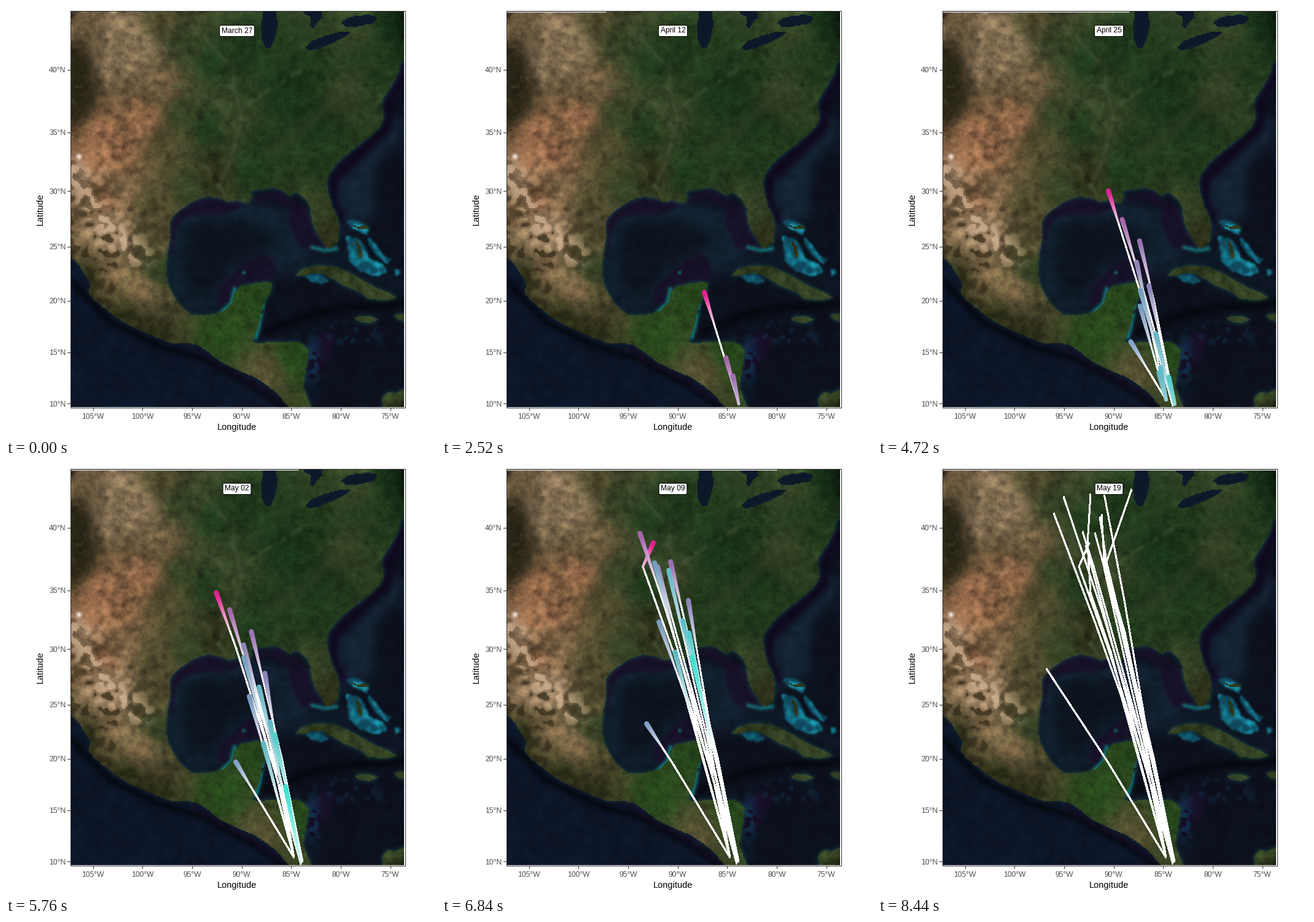
Write a matplotlib script that moves like this. It is 700 px wide and 700 px high and loops after 8480 ms.

```python
import matplotlib.pyplot as plt
import numpy as np
from matplotlib.animation import FuncAnimation
from matplotlib.collections import LineCollection
from matplotlib.colors import to_rgb
from matplotlib.patches import Rectangle
from matplotlib.path import Path

FRAMES, STEP, TAIL = 212, 40, 19
PX = 0.72  # points per pixel at 100 dpi
LEFT, RIGHT, TOP, BOTTOM = 105, 648, 8, 653
plt.rcParams["font.family"] = "Liberation Sans"
rng = np.random.default_rng(4)

# ---- satellite-style base map, worked out on a coarse grid ----
X, Y = np.meshgrid(np.arange(LEFT + 1, RIGHT + 1, 2.0), np.arange(TOP + 1, BOTTOM + 1, 2.0))
GRID = np.column_stack([X.ravel(), Y.ravel()])


def blur(a, s):
    n = int(3 * s) + 1
    k = np.exp(-0.5 * (np.arange(-n, n + 1) / s) ** 2)
    k /= k.sum()
    for axis in (0, 1):
        pad = [(0, 0), (0, 0)]
        pad[axis] = (n, n)
        a = np.apply_along_axis(np.convolve, axis, np.pad(a, pad, mode="edge"), k, "valid")
    return a


def noise(s):
    n = blur(rng.standard_normal(X.shape), s)
    return n / n.std()


def area(pts, soft=0):
    m = Path(pts).contains_points(GRID).reshape(X.shape).astype(float)
    return blur(m, soft) if soft else m


def stroke(pts, w):
    d = np.full(X.shape, 1e9)
    for (x0, y0), (x1, y1) in zip(pts, pts[1:]):
        dx, dy = x1 - x0, y1 - y0
        t = np.clip(((X - x0) * dx + (Y - y0) * dy) / (dx * dx + dy * dy), 0, 1)
        d = np.minimum(d, np.hypot(X - x0 - t * dx, Y - y0 - t * dy))
    return np.exp(-((d / w) ** 2))


def blob(x, y, rx, ry):
    return np.exp(-(((X - x) / rx) ** 2) - ((Y - y) / ry) ** 2)


def mix(img, rgb, amount):
    return img + (np.array(rgb) - img) * np.clip(amount, 0, 1)[..., None]


ATLANTIC = [
    (652, 86), (641, 93), (640, 108), (627, 132), (613, 153), (612, 165), (616, 176), (613, 190),
    (606, 200), (596, 210), (575, 226), (549, 247), (535, 262), (527, 273), (523, 287), (525, 302),
    (532, 328), (540, 345), (543, 360), (541, 385), (531, 396), (521, 393), (514, 380), (506, 368),
    (499, 354), (497, 329), (489, 314), (478, 305), (470, 303), (464, 309), (447, 298), (436, 296),
    (418, 298), (401, 301),
]
GULF = [
    (397, 305), (402, 311), (396, 321), (385, 319), (375, 316), (362, 319), (345, 312), (328, 310),
    (310, 315), (293, 325), (278, 337), (269, 347), (266, 358), (268, 373), (264, 398), (260, 430),
    (263, 452), (273, 472), (286, 491), (301, 503), (322, 505), (343, 501), (357, 496), (368, 484),
    (372, 468), (384, 457), (405, 453), (425, 450), (434, 453), (432, 466), (425, 478), (418, 493),
    (413, 520), (402, 547), (413, 551), (432, 547), (475, 547), (486, 553), (494, 563), (491, 583),
    (485, 620), (498, 656),
]
PACIFIC = [
    (464, 656), (440, 630), (425, 618), (405, 605), (364, 588), (346, 578), (328, 563), (312, 553),
    (292, 549), (270, 550), (245, 541), (198, 520), (178, 507), (145, 481), (135, 468), (137, 452),
    (117, 420), (100, 403),
]
CUBA = [
    (472, 440), (481, 430), (502, 424), (527, 423), (545, 428), (562, 436), (602, 459), (622, 467),
    (638, 476), (620, 480), (590, 478), (583, 470), (566, 462), (549, 455), (533, 445), (516, 436),
    (500, 435), (485, 441),
]
ISLANDS = [
    CUBA,
    [(568, 508), (588, 505), (607, 511), (592, 517), (574, 514)],
    [(631, 504), (652, 501), (652, 515), (640, 511)],
    [(616, 656), (613, 641), (622, 629), (636, 632), (652, 624), (652, 656)],
    [(571, 384), (577, 388), (582, 408), (577, 412), (573, 400)],
    [(560, 357), (575, 360), (589, 357), (592, 364), (574, 363)],
]
LAKES = [
    [(420, 6), (440, 6), (443, 30), (439, 52), (432, 68), (424, 67), (418, 55), (417, 33)],
    [(483, 6), (515, 6), (516, 19), (507, 26), (501, 37), (496, 31), (497, 18), (488, 14)],
    [(488, 68), (500, 57), (520, 49), (545, 42), (562, 41), (554, 50), (533, 60), (508, 70), (494, 72)],
    [(547, 27), (560, 18), (590, 14), (606, 18), (600, 28), (575, 33), (555, 35)],
]
TONES = {
    (48, 42, 26): [(118, 95), (122, 140), (112, 170)],
    (112, 92, 64): [(112, 25), (130, 330), (185, 300), (175, 430), (220, 465), (250, 130)],
    (134, 113, 85): [(180, 25), (165, 90), (215, 75), (160, 350)],
    (146, 103, 72): [(180, 240), (150, 205), (225, 185), (135, 250), (160, 320)],
    (160, 133, 103): [(178, 375), (118, 275)],
    (78, 74, 46): [(250, 20), (240, 320), (245, 385), (250, 500), (262, 220), (425, 595)],
    (52, 66, 36): [(290, 60), (285, 180), (300, 300), (250, 430), (370, 190), (550, 140), (570, 40),
                   (500, 340), (570, 452)],
    (45, 49, 25): [(130, 445), (195, 505), (250, 530), (340, 275), (525, 375)],
    (31, 56, 27): [(340, 90), (400, 70), (430, 230), (500, 110), (600, 90), (520, 240), (400, 270), (330, 200)],
    (23, 49, 24): [(630, 30), (455, 140), (500, 185)],
    (37, 70, 27): [(405, 475), (470, 572), (350, 535)],
}


def paint_sea(land, mid, wide):
    ocean = area(PACIFIC + [(100, 656)])
    sea = np.zeros(X.shape + (3,)) + (12, 17, 29)
    sea = mix(sea, (13, 22, 40), ocean)
    sea = mix(sea, (19, 34, 50), area([(266, 345), (400, 318), (490, 340), (520, 400), (480, 425), (440, 440),
                                       (370, 480), (300, 505), (262, 450)], 4))
    sea = mix(sea, (12, 20, 30), area([(290, 362), (345, 350), (420, 358), (455, 385), (420, 400), (365, 430),
                                       (335, 475), (300, 470), (285, 420)], 5))
    sea = mix(sea, (21, 37, 54), area([(528, 335), (530, 290), (590, 240), (640, 175), (648, 205), (600, 262),
                                       (598, 345), (565, 365), (545, 370)], 4))
    sea = mix(sea, (17, 29, 46), 0.7 * area([(480, 405), (560, 400), (650, 445), (650, 470), (560, 425), (470, 440)], 5))
    shelves = [
        [(264, 400), (266, 350), (290, 322), (330, 310), (400, 315), (440, 297), (497, 335), (503, 365), (532, 400),
         (500, 404), (478, 392), (464, 360), (460, 330), (436, 312), (400, 320), (378, 330), (348, 342), (318, 339),
         (290, 346), (276, 365), (270, 410)],
        [(345, 462), (365, 442), (395, 416), (418, 404), (434, 412), (441, 432), (433, 453), (400, 452), (375, 466),
         (360, 488), (345, 488)],
        [(492, 555), (518, 530), (542, 540), (527, 575), (507, 602), (490, 604)],
    ]
    sea = mix(sea, (23, 15, 39), 0.9 * sum(area(p, 1.5) for p in shelves))
    sea = mix(sea, (15, 10, 31), stroke([(642, 118), (622, 160), (620, 195), (570, 243), (534, 280), (531, 315),
                                         (546, 350)], 12))
    sea = mix(sea, (6, 7, 12), 0.8 * stroke([(425, 530), (500, 502), (560, 491), (650, 484)], 9))
    sea = mix(sea, (5, 8, 15), 0.8 * stroke([(105, 448), (170, 516), (250, 555), (320, 575), (400, 618), (452, 654)], 7))
    sea = mix(sea, (17, 12, 31), 0.8 * stroke([(310, 560), (350, 588), (400, 612), (450, 648)], 5))
    sea = mix(sea, (16, 58, 88), 0.8 * blob(500, 580, 12, 32) * (mid > -0.2))
    sea = mix(sea, (17, 42, 66), 0.6 * blob(560, 535, 60, 18) * (mid > 0.9))

    coast = np.clip(blur(land, 1.8) * 1.7, 0, 1)
    sea = mix(sea, (25, 66, 66), coast * np.where(ocean > 0, 0.2, 0.75))
    banks = [
        [(555, 375), (572, 379), (585, 392), (592, 412), (612, 420), (622, 434), (603, 441), (578, 433), (560, 415)],
        [(556, 352), (574, 349), (592, 362), (588, 373), (563, 361)],
        [(590, 377), (605, 392), (616, 408), (628, 413), (622, 420), (604, 407), (592, 390)],
        [(488, 440), (512, 436), (527, 448), (512, 453), (497, 449)],
        [(634, 431), (642, 430), (643, 437), (636, 440)],
    ]
    bank = np.clip(sum(area(p, 0.8) for p in banks), 0, 1)
    sea = mix(sea, (17, 88, 112), bank * 0.9)
    sea = mix(sea, (25, 160, 180), bank * np.clip(0.3 + 0.4 * mid, 0, 0.9))
    sea = mix(sea, (17, 125, 130), 0.7 * stroke([(419, 487), (413, 520), (408, 540)], 4) * (mid > -0.3))
    sea = mix(sea, (20, 130, 130), 0.7 * stroke([(372, 462), (367, 485), (352, 499)], 4))
    sea = mix(sea, (20, 130, 135), 0.7 * stroke([(500, 394), (520, 399), (538, 396)], 4))
    sea = mix(sea, (20, 120, 120), 0.8 * blob(388, 435, 3, 3))
    return sea * (1 + 0.05 * mid + 0.03 * wide)[..., None]


def paint_ground(fine, mid, wide):
    ground, total = np.zeros(X.shape + (3,)), np.zeros(X.shape)
    for rgb, spots in TONES.items():
        for x, y in spots:
            w = 1 / ((X - x) ** 2 + (Y - y) ** 2 + 150) ** 1.6
            ground += w[..., None] * np.array(rgb)
            total += w
    ground /= total[..., None]
    west = np.clip((290 - X) / 120, 0, 1)
    ground *= (1 + 0.05 * fine + (0.07 + 0.05 * west) * mid + 0.06 * wide)[..., None]
    ground = mix(ground, (78, 85, 54), 0.1 * (1 - west) * (np.abs(wide + 0.4 * mid) < 0.15))
    ground = mix(ground, (32, 32, 19), 0.85 * blob(119, 130, 24, 65) * (mid > 0))
    ground = mix(ground, (50, 42, 24), 0.7 * blob(150, 400, 70, 75) * (mid < -0.7))
    ridge = stroke([(112, 270), (135, 315), (165, 362), (188, 385), (215, 405)], 20)
    ground = mix(ground, (207, 177, 146), 0.75 * ridge * (mid > 0.6))
    ground = mix(ground, (240, 230, 222), blob(119, 245, 4, 4))
    rivers = [
        [(358, 312), (346, 292), (360, 265), (372, 230), (384, 190), (380, 160), (366, 130)],
        [(346, 292), (330, 268), (314, 252)],
        [(270, 130), (310, 140), (345, 160), (372, 195)],
        [(390, 165), (430, 135), (480, 105)],
        [(290, 20), (330, 60), (368, 100), (372, 130)],
    ]
    for r in rivers:
        ground = mix(ground, (76, 85, 57), 0.45 * stroke(r, 4) * np.clip(0.8 + 0.4 * mid, 0, 1))
    return mix(ground, (55, 64, 38), 0.45 * stroke([(430, 235), (480, 205), (535, 155), (590, 95)], 12))


def base_map():
    lakes = np.clip(sum(area(p) for p in LAKES), 0, 1)
    land = area([(100, 4), (652, 4)] + ATLANTIC + GULF + PACIFIC)
    land = np.clip(land + sum(area(p) for p in ISLANDS) - lakes, 0, 1)
    fine, mid, wide = noise(0.7), noise(2), noise(7)
    img = np.where(land[..., None] > 0, paint_ground(fine, mid, wide), paint_sea(land, mid, wide))
    img = mix(img, (13, 25, 42), 0.95 * lakes)
    img = mix(img, (26, 52, 48), 0.35 * land * np.clip(1.6 - 2 * blur(land, 1), 0, 1))
    return np.clip(img, 0, 255).astype(np.uint8)


# ---- flight paths: colour, start time, home, then (time, x, y) ----
EAST, INLAND, SHORE = (483, 648), (469, 641), (480, 651)
FLIGHTS = [
    ("#83a0c8", 78, INLAND, [(144, 374, 485), (210, 274, 333)]),
    ("#7a9bc0", 82, INLAND, [(144, 396, 378), (171, 353, 257), (210, 286, 80)]),
    ("#e0218f", 2, EAST, [(63, 427, 466), (118, 375, 301), (156, 327, 167), (171, 344, 128)]),
    ("#a666aa", 44, EAST, [(95, 427, 445), (144, 364, 237), (184, 302, 53)]),
    ("#9a72b0", 51, EAST, [(95, 449, 479), (171, 372, 159), (187, 361, 86)]),
    ("#9087b8", 67, INLAND, [(118, 421, 417), (171, 351, 167), (183, 333, 110)]),
    ("#8b85b8", 71, EAST, [(118, 441, 455), (171, 401, 222), (210, 368, 48)]),
    ("#759fc0", 82, SHORE, [(118, 427, 463), (171, 346, 161), (176, 338, 132)]),
    ("#68b7c6", 100, SHORE, [(144, 412, 363), (171, 369, 173), (184, 364, 82)]),
    ("#62bcc8", 110, INLAND, [(144, 430, 420), (171, 392, 255), (194, 353, 112)]),
    ("#63b9c3", 110, INLAND, [(171, 379, 306), (187, 346, 210), (199, 341, 130), (210, 346, 49)]),
    ("#55cccb", 111, EAST, [(144, 437, 440), (171, 402, 275), (189, 370, 165), (202, 364, 90)]),
    ("#40e0d0", 128, SHORE, [(144, 455, 525), (171, 407, 314), (192, 370, 165), (210, 413, 41)]),
]


class Flight:
    def __init__(self, color, start, home, knots):
        self.color = np.array(to_rgb(color))
        t, x, y = np.array([(start, *home)] + knots, float).T
        self.start, self.end = start, int(t[-1])
        when = np.arange(start, self.end + 1)
        self.path = np.column_stack([np.interp(when, t, x), np.interp(when, t, y)])

    def trace(self, k):
        return self.path[:max(0, k - self.start + 1)]

    def tail(self, k):
        """Segments with widths and colours, oldest first."""
        for j in range(max(self.start, k - TAIL), min(self.end, k)):
            i = j - self.start
            f = 1 - (k - 1 - j) / TAIL
            yield self.path[i:i + 2], (2 + 6 * f) * PX, 1 + (self.color - 1) * f


flights = [Flight(*f) for f in FLIGHTS]

# ---- stage ----
fig = plt.figure(figsize=(7, 7), dpi=100, facecolor="white")
ax = fig.add_axes([0, 0, 1, 1])
ax.axis("off")
ax.imshow(base_map(), extent=(LEFT, RIGHT, BOTTOM, TOP), interpolation="nearest", aspect="auto", zorder=0)
ax.set(xlim=(0, 700), ylim=(700, 0))
clip = Rectangle((LEFT, TOP), RIGHT - LEFT, BOTTOM - TOP, transform=ax.transData)


def tick(xs, ys):
    ax.plot(xs, ys, color="#333333", lw=PX, zorder=6)


ax.add_patch(Rectangle((104.5, 7.5), 545, 646.5, fill=False, ec="#333333", lw=PX, zorder=6))
for lon, x in zip(range(105, 70, -5), np.linspace(141.5, 625.5, 7)):
    tick([x, x], [654, 658])
    ax.text(x, 672, f"{lon}°W", size=12 * PX, color="#4d4d4d", ha="center", va="baseline")
for lat, y in zip(range(40, 5, -5), (103.5, 205.5, 300.5, 391.5, 479.5, 563.5, 646.5)):
    tick([100, 104], [y, y])
    ax.text(97.5, y + 5, f"{lat}°N", size=12.2 * PX, color="#4d4d4d", ha="right", va="baseline")
ax.text(375.5, 690, "Longitude", size=14.5 * PX, ha="center", va="baseline")
ax.text(63, 331, "Latitude", size=14.5 * PX, rotation=90, ha="right", va="center")

traces = LineCollection([], colors="white", linewidths=2 * PX, antialiaseds=False, zorder=2)
tails = LineCollection([], capstyle="round", zorder=3)
for c in (traces, tails):
    ax.add_collection(c, autolim=False)
    c.set_clip_path(clip)
bar, = ax.plot([], [], color="#bebebe", lw=2.6 * PX, solid_capstyle="butt", zorder=5)
label = ax.text(376, 40.5, "", size=12 * PX, ha="center", va="center", zorder=5,
                bbox=dict(boxstyle="round,pad=0.26,rounding_size=0.2", fc="white", ec="black", lw=PX))


def date(k):
    day = 27 + int(k / 4 + 0.25)
    for month, length in (("March", 31), ("April", 30)):
        if day <= length:
            return f"{month} {day:02d}"
        day -= length
    return f"May {day:02d}"


def draw(k):
    label.set_text(date(k))
    bar.set_data([LEFT, LEFT + (RIGHT - LEFT) * k / (FRAMES - 1)], [9.2, 9.2])
    traces.set_segments([p for p in (f.trace(k) for f in flights) if len(p) > 1])
    parts = [s for f in flights for s in f.tail(k)]
    tails.set_segments([s[0] for s in parts])
    tails.set_linewidths([s[1] for s in parts] or [1])
    tails.set_colors([s[2] for s in parts] or ["white"])
    tails.set_alpha(min(1, (FRAMES - 1 - k) / TAIL))
    return traces, tails, bar, label


anim = FuncAnimation(fig, draw, frames=FRAMES, interval=STEP, repeat=True, repeat_delay=0, blit=False)
plt.show()
```
